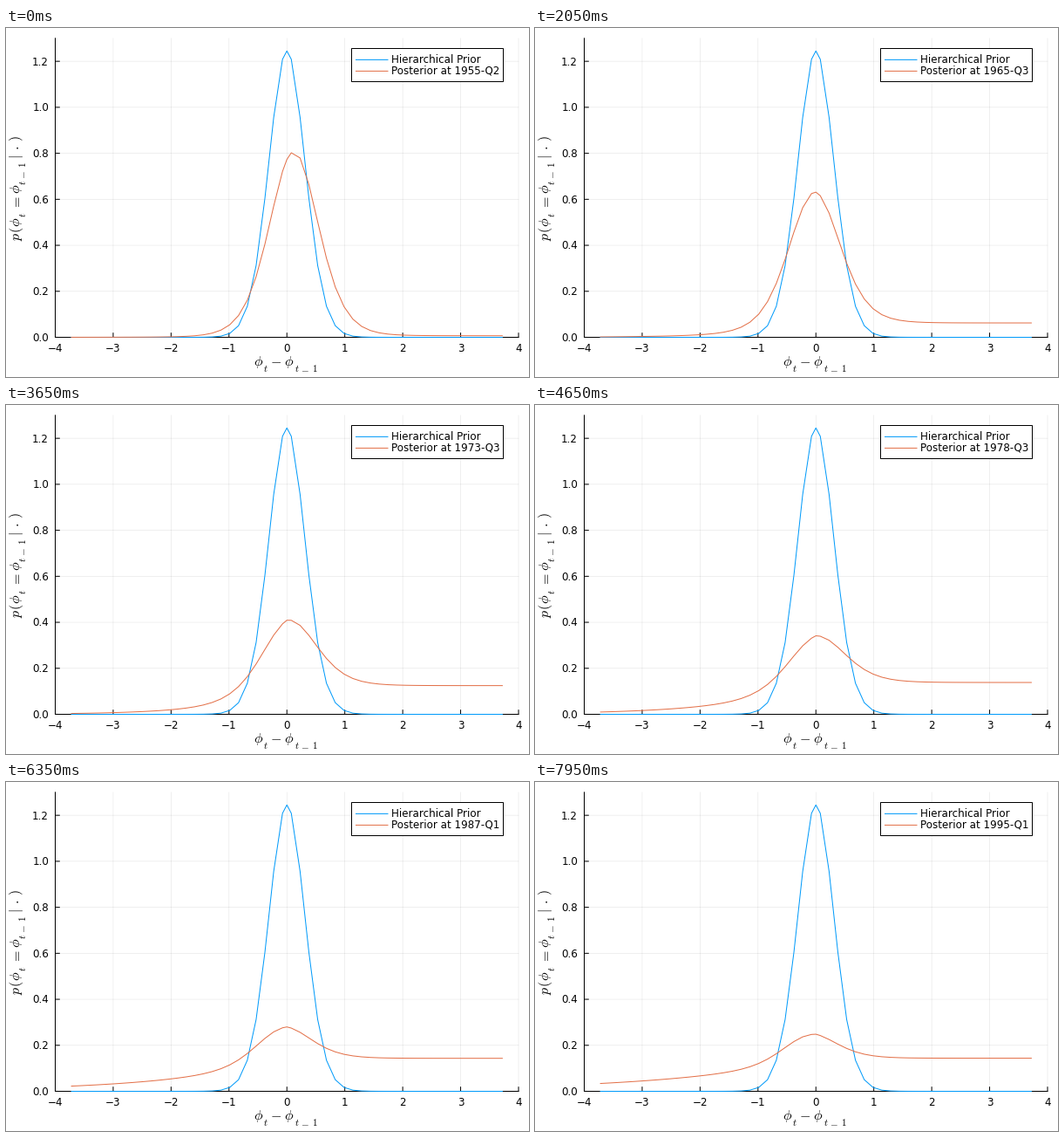
Write a matplotlib script that moves like this. It is 600 px wide and 400 px high and loops after 8000 ms.

```python
import numpy as np
import matplotlib.pyplot as plt
from matplotlib.animation import FuncAnimation
from matplotlib.patches import Rectangle

W, H, DPI = 600, 400, 100
PX = 72 / DPI
STEP_MS, FRAMES = 50, 160
BLUE, ORANGE = (0, 0.6056, 0.9787), (0.8889, 0.4356, 0.2781)
LEFT, RIGHT, TOP, BOTTOM = 56.5, 588.0, 11.8, 354.5

plt.rcParams["font.family"] = "DejaVu Sans"
fig = plt.figure(figsize=(W / DPI, H / DPI), dpi=DPI, facecolor="white")
ax = fig.add_axes([0, 0, 1, 1])
ax.set_xlim(0, W)
ax.set_ylim(H, 0)
ax.axis("off")


def px(x):
    return LEFT + (np.asarray(x) + 4) * (RIGHT - LEFT) / 8


def py(y):
    return BOTTOM - np.asarray(y) * (BOTTOM - TOP) / 1.3


def line(xs, ys, color="black", width=1.0, z=2, **kw):
    return ax.plot(xs, ys, color=color, lw=width * PX, zorder=z,
                   snap=False, **kw)[0]


def label(x, y, s, ha="left"):
    return ax.text(x, y, s, size=11.85 * PX, ha=ha, va="baseline", zorder=6)


def formula(x, y, s, size=16, rotation=0):
    ax.text(x, y, f"${s}$", size=size * PX, math_fontfamily="cm", ha="left",
            va="baseline", rotation=rotation, rotation_mode="anchor")


# axes, grid and ticks
for v in range(-4, 5):
    x = px(v)
    line([x, x], [TOP, BOTTOM], width=0.6, z=1, alpha=0.1)
    line([x, x], [BOTTOM, BOTTOM - 5.3], solid_capstyle="butt")
    label(x, 371, str(v).replace("-", "\u2212"), "center")
for k in range(7):
    y = py(0.2 * k)
    line([LEFT, RIGHT], [y, y], width=0.6, z=1, alpha=0.1)
    line([LEFT, LEFT + 5.3], [y, y], solid_capstyle="butt")
    label(49.1, y + 4.4, f"{0.2 * k:.1f}", "right")
line([LEFT, RIGHT], [BOTTOM, BOTTOM])
line([LEFT, LEFT], [TOP, BOTTOM])

# axis titles, set piece by piece
for x, s in [(284.5, r"\phi"), (303, "-"), (319, r"\phi")]:
    formula(x, 386.6, s)
for x, s in [(295.3, "t"), (331, "t"), (338.5, "-"), (351.3, "1")]:
    formula(x, 394, s, 11.2)
for y, s in [(243.5, "p"), (235, "("), (227.8, r"\phi"), (208, "="),
             (190.3, r"\phi"), (150.3, "|"), (140, r"\cdot"), (130.5, ")")]:
    formula(16, y, s, rotation=90)
for y, s in [(217, "t"), (180, "t"), (172.8, "-"), (160, "1")]:
    formula(22.7, y, s, 11.2, 90)

# legend
ax.add_patch(Rectangle((396.5, 23.5), 174, 38, fc="white", ec="black",
                       lw=PX, zorder=5, snap=False))
for y, color in [(36.4, BLUE), (49.4, ORANGE)]:
    line([401.5, 438], [y, y], color, z=6)
label(442, 40, "Hierarchical Prior")
caption = label(442, 53, "")

# density grid: 50 even points plus the centre
grid = np.sort(np.append(np.linspace(-3.72, 3.72, 50), 0))


def bell(x, width, n):
    """Bell curve whose tails get heavier as n falls."""
    return (1 + (x / width) ** 2 / (2 * n)) ** -n


def posterior(t):
    """A flattening bell on a floor: exponential on the left, level on the right."""
    level = 0.144 / (1 + np.exp((45 - t) / 15))
    decay = 1.05 + 0.0178 * max(0, t - 73)
    floor = level * np.exp(np.minimum(grid, 0) / decay)
    peak, centre, width = (np.interp(t, KEYS, p) for p in (PEAK, CENTRE, WIDTH))
    return floor + peak * bell(grid - centre, width, 5)


KEYS = [0, 19, 41, 73, 93, 127, 159]
PEAK = [0.80, 0.82, 0.57, 0.285, 0.203, 0.138, 0.108]
CENTRE = [0.12, -0.215, -0.03, 0.035, 0.01, -0.07, -0.12]
WIDTH = [0.41, 0.373, 0.43, 0.467, 0.483, 0.467, 0.455]

line(px(grid), py(1.245 * bell(grid, 0.312, 14.7)), BLUE, z=3)
curve = line(px(grid), py(posterior(0)), ORANGE, z=4)


def update(i):
    curve.set_ydata(py(posterior(i)))
    year, quarter = divmod(1955 * 4 + 1 + i, 4)
    caption.set_text(f"Posterior at {year}-Q{quarter + 1}")
    return curve, caption


anim = FuncAnimation(fig, update, frames=FRAMES, interval=STEP_MS,
                     repeat=True, repeat_delay=0, blit=False)
plt.show()
```
